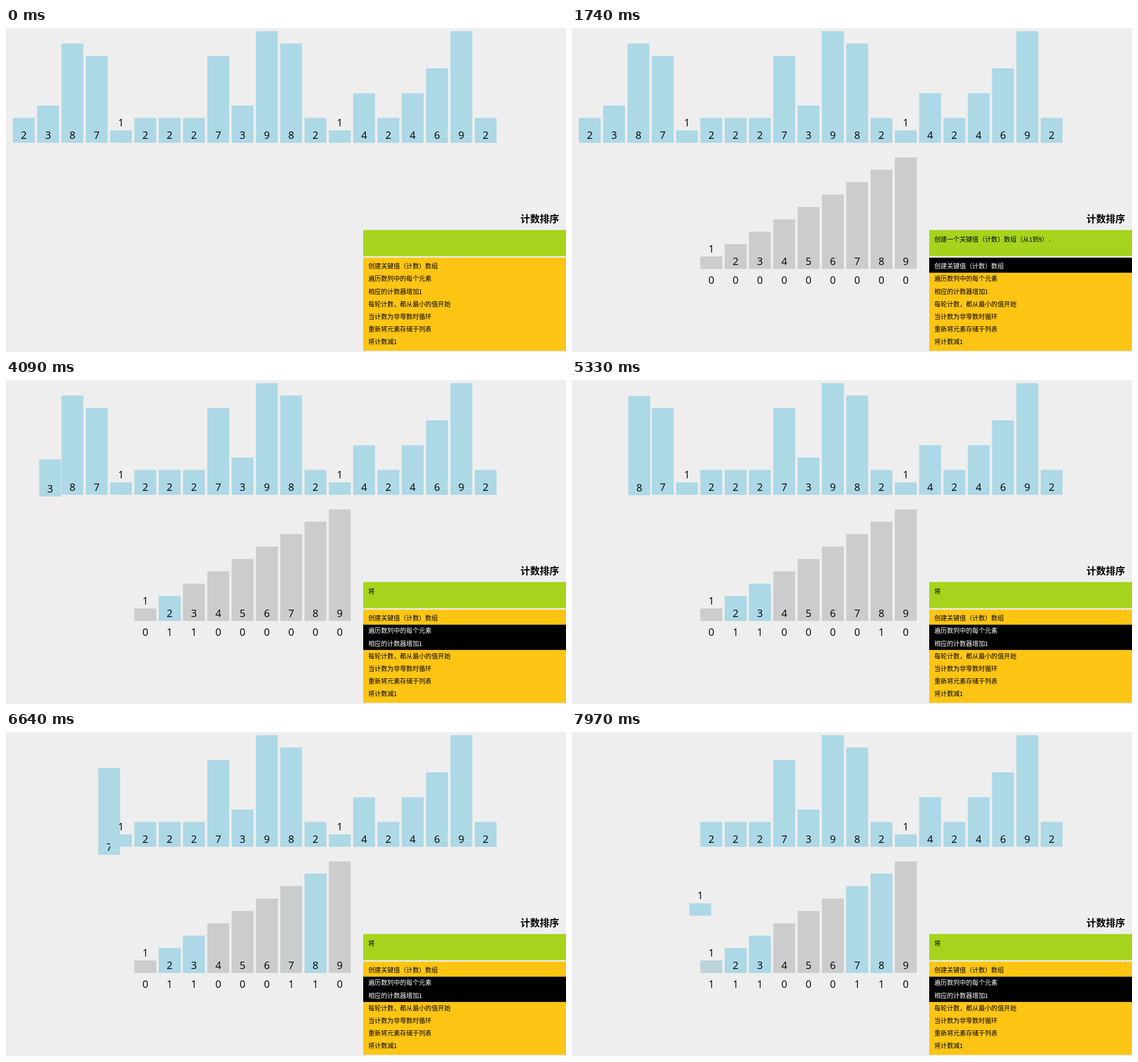
An HTML page for the animation above (8 s loop, 983 by 570 pixels).

```html
<!DOCTYPE html>
<html lang="zh-CN">
<head>
<meta charset="utf-8">
<title>计数排序</title>
<style>
  html, body { margin: 0; width: 100%; height: 100%; overflow: hidden; background: #eee; }
  svg { display: block; width: 983px; height: 570px; }
  .digit { font: 18px "Open Sans", "Noto Sans", sans-serif; text-anchor: middle; }
  .title { font: bold 17px "Noto Sans CJK SC", "Noto Sans CJK", sans-serif; text-anchor: end; }
  .line { font: 11.1px "Noto Sans Mono CJK SC", "Noto Sans CJK SC", "Noto Sans CJK", sans-serif; }
  .code { font-weight: 300; }
</style>
</head>
<body>
<svg id="stage" viewBox="0 0 983 570"></svg>
<script>
const LOOP = 8000, DURATION = 250;
const PITCH = 42.67, WIDTH = 38.4, UNIT = 21.81;
const TOP_BASE = 201.9, LOW_BASE = 423.8;
const BLUE = [173, 216, 230], GREY = [204, 204, 204];
const values = [2, 3, 8, 7, 1, 2, 2, 2, 7, 3, 9, 8, 2, 1, 4, 2, 4, 6, 9, 2];
const steps = ['创建关键值（计数）数组', '遍历数列中的每个元素', '相应的计数器增加1',
  '每轮计数，都从最小的值开始', '当计数为非零数时循环', '重新将元素存储于列表', '将计数减1'];

// The picture only refreshes at these moments and holds in between.
const ticks = [0, 1500, 1590, 1660, 1740, 2830, 2900, 2980, 3060, 4090, 4150, 4240, 4320,
  5330, 5400, 5480, 5560, 6640, 6730, 6800, 6880, 7890, 7970];
const growStart = 1480;
const moveStarts = [2800, 4052, 5306, 6577, 7841];

const stage = document.getElementById('stage');

function add(tag, attrs, parent = stage, text = '') {
  const node = document.createElementNS('http://www.w3.org/2000/svg', tag);
  set(node, attrs);
  node.textContent = text;
  return parent.appendChild(node);
}

function set(node, attrs) {
  for (const name in attrs) node.setAttribute(name, attrs[name]);
}

const slotX = i => 12 + PITCH * i;
const mix = (a, b, p) => `rgb(${a.map((v, i) => Math.round(v + (b[i] - v) * p))})`;

// Cubic in-out progress of a transition begun at `start`
function progress(time, start) {
  const p = Math.min(1, Math.max(0, (time - start) / DURATION));
  return p < 0.5 ? 4 * p ** 3 : 1 - 4 * (1 - p) ** 3;
}

function makeBar(value, slot, base, color) {
  const group = add('g', {});
  const x = slotX(slot);
  const rect = add('rect', { x, y: base - value * UNIT, width: WIDTH, height: value * UNIT, fill: mix(color, color, 0) }, group);
  const y = base - 6.9 - (value === 1 ? UNIT : 0);
  add('text', { class: 'digit', x: x + WIDTH / 2, y }, group, value);
  return { value, slot, group, rect };
}

const bars = values.map((v, i) => makeBar(v, i, TOP_BASE, BLUE));
const bins = Array.from({ length: 9 }, (_, i) => {
  const bin = makeBar(i + 1, i + 5, LOW_BASE, GREY);
  bin.count = add('text', { class: 'digit', x: slotX(i + 5) + WIDTH / 2, y: 450 }, bin.group);
  return bin;
});

add('text', { class: 'title', x: 971, y: 342.4 }, stage, '计数排序');
add('rect', { x: 627, y: 355.5, width: 356, height: 46, fill: '#a6d41c' });
const status = add('text', { class: 'line', x: 636, y: 376.2 });
add('rect', { x: 627, y: 404, width: 356, height: 164, fill: '#fec515' });
const mark = add('rect', { x: 627, width: 356 });
const lines = steps.map((text, i) =>
  add('text', { class: 'line code', x: 636, y: 423.2 + 22.2 * i }, stage, text));

function draw(time) {
  const created = time >= growStart;
  const moving = time >= moveStarts[0];
  const grown = progress(time, growStart);
  const counts = Array(10).fill(0);
  const tint = Array(10).fill(0);

  moveStarts.forEach((start, i) => {
    const { value, slot, group } = bars[i];
    const p = progress(time, start);
    const dx = p * PITCH * (value + 4 - slot), dy = p * (LOW_BASE - TOP_BASE);
    set(group, { transform: `translate(${dx} ${dy})` });
    if (time >= start) counts[value]++;
    tint[value] = Math.max(tint[value], p);
  });

  for (const { value, group, rect, count } of bins) {
    set(group, { visibility: created ? 'visible' : 'hidden' });
    set(rect, { width: WIDTH * grown, height: value * UNIT * grown, fill: mix(GREY, BLUE, tint[value]) });
    count.textContent = counts[value];
  }

  status.textContent = moving ? '将' : created ? '创建一个关键值（计数）数组（从1到9）.' : '';
  set(mark, moving ? { y: 430.5, height: 44.4 } : { y: 404, height: created ? 26.5 : 0 });
  lines.forEach((line, i) => {
    const active = moving ? i === 1 || i === 2 : created && i === 0;
    set(line, { fill: active ? '#fff' : '#000' });
  });
}

function frame() {
  const now = performance.now() % LOOP;
  draw(ticks.findLast(t => t <= now));
  requestAnimationFrame(frame);
}
frame();
</script>
</body>
</html>
```
